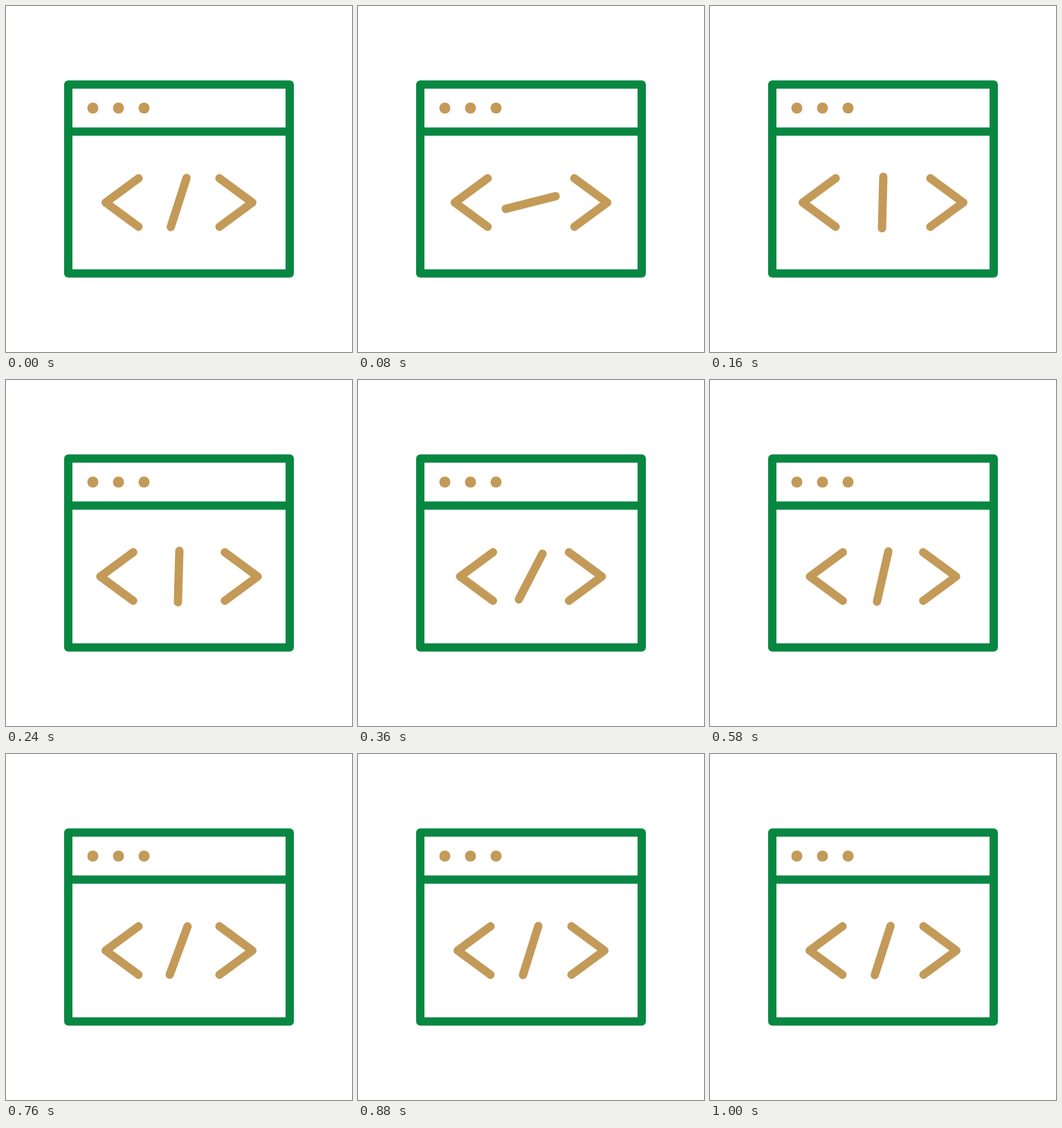
Write an HTML page that moves like this. It is 500x500 px and loops after 1.02 s.

```html
<!DOCTYPE html>
<html>
<head>
<meta charset="utf-8">
<style>
  html, body { margin: 0; width: 100%; height: 100%; overflow: hidden; background: #fff; }
  svg { display: block; width: 100vw; height: 100vh; }
  path { fill: none; stroke-width: 12; stroke-linecap: round; stroke-linejoin: round; }
  .frame { stroke: #088742; }
  .code { stroke: #c39a58; }
  circle { fill: #c39a58; }
</style>
</head>
<body>
<svg viewBox="0 0 500 500">
  <path class="frame" d="M90 113.5H410V386.5H90ZM90 181.5H410"/>
  <circle cx="125.5" cy="147.5" r="8"/>
  <circle cx="162.5" cy="147.5" r="8"/>
  <circle cx="199.5" cy="147.5" r="8"/>
  <path class="code" id="left" d="M191.5 249L144 284L191.5 319"/>
  <path class="code" id="slash" d="M0 -37.2V37.2"/>
  <path class="code" id="right" d="M308.5 249L356 284L308.5 319"/>
</svg>
<script>
const LOOP = 1020, STEP = 20, REST = 17.8;
const [left, slash, right] = ['left', 'slash', 'right'].map(id => document.getElementById(id));

// Bracket shift towards the centre: [time, px]
const shiftKeys = [[0, 0], [185, -10.5], [380, 4], [630, 0]];

function shiftAt(t) {
  for (let i = 1; i < shiftKeys.length; i++) {
    const [t0, a] = shiftKeys[i - 1], [t1, b] = shiftKeys[i];
    if (t < t1) {
      const u = (t - t0) / (t1 - t0);
      return a + (b - a) * u * u * (3 - 2 * u);
    }
  }
  return 0;
}

// Half turn counter-clockwise, then a damped swing that dies out at 1 s
function angleAt(t) {
  const turn = 118;
  if (t < turn) return REST - 180 * t / turn;
  const s = (t - turn) / 1000;
  const fade = Math.max(0, 1 - (t / 1000) ** 12);
  return REST - 29.3 * Math.exp(-3.8 * s) * Math.sin(2 * Math.PI * 2.7 * s) * fade;
}

function draw(now) {
  const t = Math.floor(now % LOOP / STEP) * STEP;
  const shift = shiftAt(t);
  left.setAttribute('transform', `translate(${shift} 0)`);
  right.setAttribute('transform', `translate(${-shift} 0)`);
  slash.setAttribute('transform', `translate(249.5 284) rotate(${angleAt(t)})`);
}

let start;
function tick(now) {
  start ??= now;
  draw(now - start);
  requestAnimationFrame(tick);
}
draw(0);
requestAnimationFrame(tick);
</script>
</body>
</html>
```
